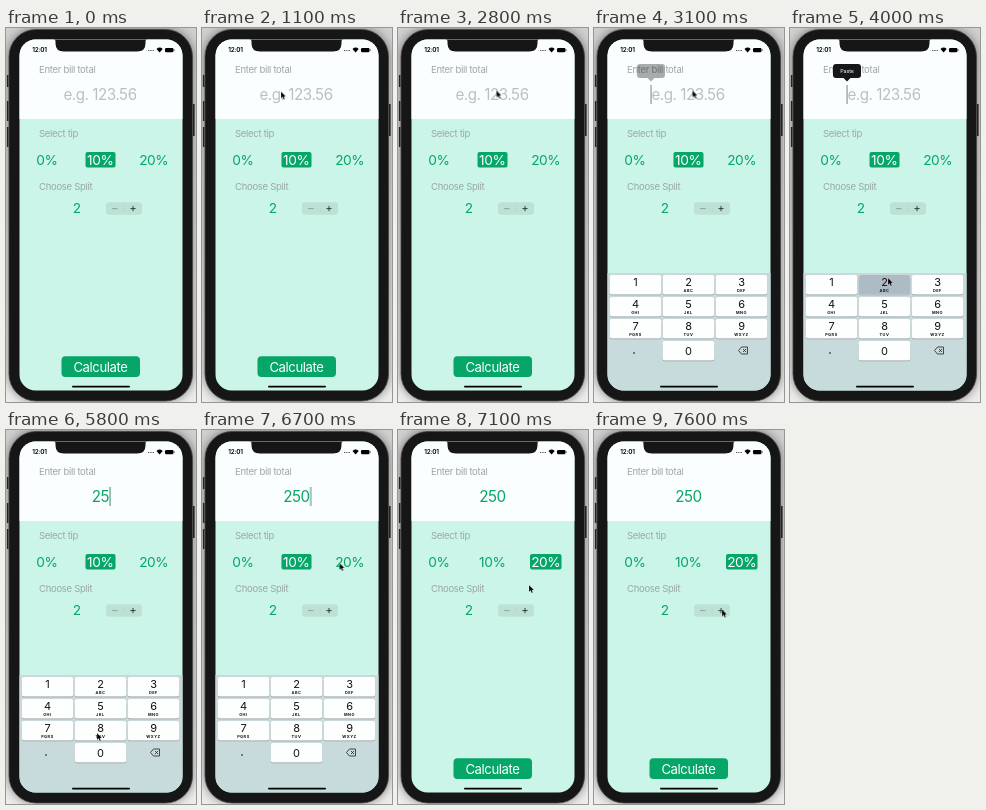
Animation, 190 px wide and 374 px high, one loop 8 s. Source, as an HTML page:

```html
<!DOCTYPE html>
<html lang="en">
<head>
<meta charset="utf-8">
<title>Tip calculator</title>
<style>
  html, body { margin: 0; width: 100%; height: 100%; overflow: hidden; background: #c8c8c8; }
  svg { display: block; width: 100vw; height: 100vh; }
  text { font-family: Inter, Roboto, sans-serif; letter-spacing: -.03em; }
  .mid { text-anchor: middle; }
  .label { font-size: 9.5px; fill: #9ca7a4; }
  .amount { font-size: 15.2px; }
  .option { font-size: 13.7px; }
  .hint { fill: #bbbfc0; }
  .green { fill: #05a667; }
  .white { fill: #fff; }
  .digit { font-size: 11px; fill: #111; }
  .letters { font-size: 3.9px; font-weight: 700; letter-spacing: .12em; fill: #111; }

  .timed { animation: 8s step-end infinite; }
  #pointer { animation-name: pointer; }
  #keyboard { animation-name: keyboard; }
  #popup { animation-name: popup; }
  #paste { animation-name: paste; }
  #caret { animation-name: caret; }
  #hint { animation-name: hint; }
  #partial { animation-name: partial; }
  #total { animation-name: total; }
  #ten { animation-name: ten; }
  #twenty { animation-name: twenty; }
  #pressed { animation-name: pressed; }

  @keyframes pointer {
    0% { opacity: 0; transform: translate(86px, 101px); }
    5% { opacity: 1; transform: translate(86px, 101px); }
    10% { transform: translate(74px, 65px); }
    12.5% { transform: translate(77px, 64px); }
    13.75% { transform: translate(79px, 63.5px); }
    23.75% { transform: translate(93px, 63px); }
    28.75% { transform: translate(98px, 63px); }
    35% { transform: translate(98.5px, 62.5px); }
    42.5% { transform: translate(100px, 240px); }
    45% { transform: translate(98px, 250px); }
    52.5% { transform: translate(98px, 264px); }
    53.75% { transform: translate(98px, 274px); }
    57.5% { transform: translate(98px, 276px); }
    61.25% { transform: translate(98px, 304px); }
    63.75% { transform: translate(97px, 308px); }
    65% { transform: translate(95px, 311px); }
    68.75% { transform: translate(95px, 316px); }
    72.5% { transform: translate(91px, 303px); }
    76.25% { transform: translate(118px, 200px); }
    77.5% { transform: translate(143px, 101px); }
    80% { transform: translate(135px, 127px); }
    83.75% { transform: translate(137.5px, 133px); }
    88.75% { transform: translate(131px, 155px); }
    90% { transform: translate(128px, 175px); }
    92.5% { transform: translate(128px, 178.5px); }
    95%, 100% { opacity: 1; transform: translate(128px, 179.5px); }
  }
  @keyframes keyboard { 0%, 88.75%, 100% { opacity: 0; } 38.75% { opacity: 1; } }
  @keyframes popup {
    0%, 65%, 100% { opacity: 0; }
    38.75%, 63.75% { opacity: .35; }
    40% { opacity: 1; }
  }
  @keyframes paste { 0%, 63.75%, 100% { opacity: 0; } 40% { opacity: 1; } }
  @keyframes caret {
    0% { opacity: 0; transform: translateX(57px); fill: #858b8c; }
    38.75% { opacity: 1; transform: translateX(57px); fill: #858b8c; }
    63.75% { opacity: 1; transform: translateX(104px); fill: #55907c; }
    76.25% { opacity: 1; transform: translateX(108.7px); fill: #55907c; }
    88.75%, 100% { opacity: 0; transform: translateX(108.7px); fill: #55907c; }
  }
  @keyframes hint { 0% { opacity: 1; } 63.75%, 100% { opacity: 0; } }
  @keyframes partial { 0%, 76.25%, 100% { opacity: 0; } 63.75% { opacity: 1; } }
  @keyframes total { 0% { opacity: 0; } 76.25%, 100% { opacity: 1; } }
  @keyframes ten { 0% { opacity: 1; } 88.75%, 100% { opacity: 0; } }
  @keyframes twenty { 0% { opacity: 0; } 88.75%, 100% { opacity: 1; } }
  @keyframes pressed { 0%, 63.75%, 100% { opacity: 0; } 50% { opacity: 1; } }
</style>
</head>
<body>
<svg viewBox="0 0 190 374" preserveAspectRatio="none">
  <defs>
    <linearGradient id="backdrop" x2="0" y2="1">
      <stop stop-color="#cfcfcf"/><stop offset="1" stop-color="#ececec"/>
    </linearGradient>
    <linearGradient id="board" x2="0" y2="1">
      <stop stop-color="#cbd7da"/><stop offset="1" stop-color="#c6dcdc"/>
    </linearGradient>
    <filter id="soft"><feGaussianBlur stdDeviation="5"/></filter>
    <clipPath id="screen"><rect x="13.5" y="11.5" width="163" height="351" rx="16"/></clipPath>
  </defs>

  <rect width="190" height="374" fill="url(#backdrop)"/>
  <rect x="2.5" y="1" width="184.500" height="372" rx="27" opacity=".45" filter="url(#soft)"/>
  <path d="M1.700 47v12M1.700 73v20M1.700 99v20M187.800 76v32" stroke="#222" stroke-width="1.600"/>
  <rect x="3" y="1.500" width="183.500" height="371.500" rx="27" fill="#161617" stroke="#48484a" stroke-width=".8"/>

  <g clip-path="url(#screen)">
    <rect x="13" y="11" width="164" height="353" fill="#cbf5e9"/>
    <rect x="13" y="11" width="164" height="80" fill="#fafefe"/>
    <path d="M47 11q2.500 0 2.500 2.500v2q0 8 8.500 8h73q8.500 0 8.500-8v-2q0-2.500 2.500-2.500z" fill="#161617"/>

    <text x="33.500" y="24.300" class="mid" font-size="6.400" font-weight="600">12:01</text>
    <path d="M142 22.500h6" stroke="#555" stroke-dasharray="1 .7"/>
    <path d="M150.500 21q3.100-2.900 6.200 0l-3.100 3.400z"/>
    <rect x="159" y="20" width="8.500" height="4.200" rx="1.200"/>
    <path d="M168.500 21.400v1.500" stroke="#555" stroke-width=".7"/>

    <text x="33" y="44.500" class="label">Enter bill total</text>
    <text x="33" y="108.800" class="label">Select tip</text>
    <text x="33" y="161.700" class="label">Choose Split</text>

    <text id="hint" x="94" y="72" class="timed mid amount hint">e.g. 123.56</text>
    <text id="partial" x="94.500" y="72" class="timed mid amount green">25</text>
    <text id="total" x="94.500" y="72" class="timed mid amount green">250</text>
    <rect id="caret" class="timed" x="-.5" y="57" width="1.100" height="19"/>

    <g class="mid option green">
      <text x="40.800" y="136.800">0%</text>
      <text x="94.300" y="136.800">10%</text>
      <text x="147.800" y="136.800">20%</text>
      <text x="70.700" y="185">2</text>
    </g>
    <g id="ten" class="timed mid option">
      <rect x="79.500" y="124" width="30" height="15.500" rx="2" class="green"/>
      <text x="94.300" y="136.800" class="white">10%</text>
    </g>
    <g id="twenty" class="timed mid option">
      <rect x="132" y="124" width="31.500" height="15.500" rx="2" class="green"/>
      <text x="147.800" y="136.800" class="white">20%</text>
    </g>

    <rect x="100" y="174.300" width="36" height="12.500" rx="3" fill="#bde1d5"/>
    <path d="M118.200 178v5.500" stroke="#a9cec2" stroke-width=".5"/>
    <path d="M106.200 180.600h5.400" stroke="#81998f" stroke-width=".8"/>
    <path d="M124.400 180.600h5.200M127 178v5.200" stroke="#16221e" stroke-width=".8"/>

    <rect x="55.500" y="328.300" width="78.500" height="20.700" rx="4" class="green"/>
    <text x="94.500" y="343.600" class="mid white" font-size="13.100">Calculate</text>

    <g id="keyboard" class="timed">
      <rect x="13" y="245" width="164" height="119" fill="url(#board)"/>
      <g id="keys" class="mid"></g>
      <circle cx="40" cy="325" r=".8"/>
      <path d="M144.500 322.500l3-3.500h6v7h-6zM149 321l3 3m0-3l-3 3" fill="none" stroke="#222" stroke-width=".8"/>
    </g>
    <rect x="66" y="357.700" width="58" height="1.800" rx=".9"/>

    <path id="popup" class="timed" d="M46 36h22q3 0 3 3v8q0 3-3 3h-7.500l-3.500 3.500-3.500-3.500h-7.500q-3 0-3-3v-8q0-3 3-3z" fill="#161718"/>
    <text id="paste" x="57" y="45" class="timed mid white" font-size="5.400">Paste</text>
  </g>

  <path id="pointer" class="timed" d="M0 0v7l1.600-1.500 1.100 2.500 1.200-.5-1-2.400h2.100z" stroke="#fff" stroke-width=".25"/>
</svg>
<script>
  const keys = document.getElementById('keys');
  const letters = ['', 'ABC', 'DEF', 'GHI', 'JKL', 'MNO', 'PQRS', 'TUV', 'WXYZ'];

  function keyCap(x, y, fill, extra = '') {
    return `<rect x="${x}" y="${y}" width="51.5" height="19.5" rx="2.2" fill="${fill}" ${extra}/>`;
  }

  function key(digit, column, row, caption = '') {
    const x = 15.7 + column * 53;
    const y = 247 + row * 22;
    const center = x + 25.7;
    const pressed = digit === 2 ? keyCap(x, y, '#adbcc4', 'id="pressed" class="timed"') : '';
    return keyCap(x, y + .7, '#8d989b') + keyCap(x, y, '#fdfefe') + pressed +
      `<text class="digit" x="${center}" y="${y + (digit ? 11.3 : 13.7)}">${digit}</text>` +
      `<text class="letters" x="${center}" y="${y + 16.5}">${caption}</text>`;
  }

  keys.innerHTML = letters.map((caption, i) => key(i + 1, i % 3, Math.floor(i / 3), caption)).join('') + key(0, 1, 3);
</script>
</body>
</html>
```
